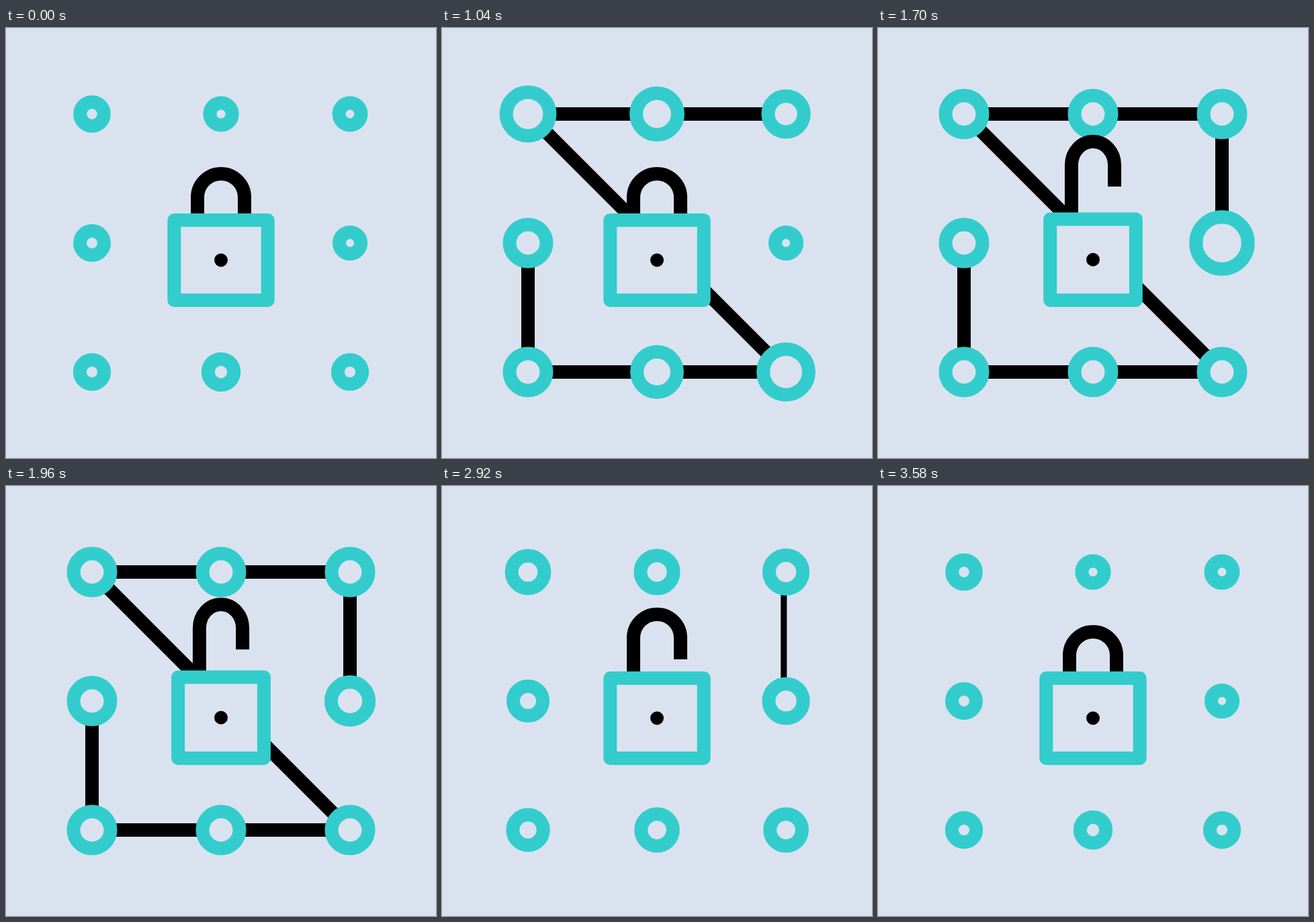
Animation of 640x640 px, one loop 3600 ms. Source, as an HTML page with a canvas:

```html
<!DOCTYPE html>
<html lang="en">
<head>
<meta charset="utf-8">
<title>Pattern lock</title>
<style>
  html, body { margin: 0; width: 100%; height: 100%; overflow: hidden; background: #dae2ef; }
  canvas { display: block; width: 640px; height: 640px; }
</style>
</head>
<body>
<canvas id="stage" width="640" height="640"></canvas>
<script>
const ctx = document.getElementById('stage').getContext('2d');
const LOOP = 3600, STEP = 20;
const BG = '#dae2ef', TEAL = '#33cccc', BLACK = '#000';
const STROKE = 20, OPEN_RADIUS = 27.5;

// Nodes in pattern order; "pop" is when the line reaches the node.
const nodes = [
  { x: 128, y: 320, small: 18, pop: 260, kick: 8.5 },
  { x: 128, y: 512, small: 18.1, pop: 475, kick: 8.5 },
  { x: 320, y: 512, small: 19.2, pop: 590, kick: 8.5 },
  { x: 512, y: 512, small: 18.1, pop: 680, kick: 8.5 },
  { x: 128, y: 128, small: 17.8, pop: 812, kick: 5 },
  { x: 320, y: 128, small: 16.6, pop: 890, kick: 5 },
  { x: 512, y: 128, small: 16.4, pop: 955, kick: 5 },
  { x: 512, y: 320, small: 16.1, pop: 1440, kick: 8.5 }
];

let pathLength = 0;
nodes.forEach((node, i) => {
  const prev = nodes[i - 1] || node;
  pathLength += Math.hypot(node.x - prev.x, node.y - prev.y);
  node.at = pathLength;
});

const progress = (t, start, duration) => Math.min(1, Math.max(0, (t - start) / duration));
const mix = (a, b, k) => a + (b - a) * k;
const easeInOut = p => (1 - Math.cos(Math.PI * p)) / 2;
const backOut = (p, kick) => 1 + (p - 1) ** 2 * ((kick + 1) * (p - 1) + kick);
const bell = p => Math.sin(Math.PI * p);

function headAt(t) {
  if (t <= nodes[0].pop) return 0;
  for (let i = 1; i < nodes.length; i++) {
    const from = nodes[i - 1], to = nodes[i];
    if (t < to.pop) {
      const p = progress(t, from.pop, to.pop - from.pop);
      return mix(from.at, to.at, i === nodes.length - 1 ? p ** 1.3 : p);
    }
  }
  return pathLength;
}

function drawTrail(t) {
  const head = headAt(t);
  const tail = Math.max(0, (t - 2304) * 2.44);
  const thin = progress(t, 2890, 55);
  if (head <= tail || thin === 1) return;
  ctx.save();
  ctx.translate(-6 * thin, 0);
  ctx.lineWidth = STROKE * (1 - thin);
  ctx.lineCap = ctx.lineJoin = 'round';
  ctx.strokeStyle = BLACK;
  ctx.setLineDash([head - tail, pathLength * 2]);
  ctx.lineDashOffset = -tail;
  ctx.beginPath();
  nodes.forEach(n => ctx.lineTo(n.x, n.y));
  ctx.stroke();
  ctx.restore();
}

function drawNode(node, i, t) {
  const grow = backOut(progress(t, node.pop, 570), node.kick);
  const shrink = easeInOut(progress(t, 2510 + 30 * i, 750));
  const radius = mix(mix(node.small, OPEN_RADIUS, grow), node.small, shrink);
  ctx.beginPath();
  ctx.arc(node.x, node.y, radius, 0, Math.PI * 2);
  ctx.fillStyle = BG;
  ctx.fill();
  ctx.lineWidth = STROKE;
  ctx.strokeStyle = TEAL;
  ctx.stroke();
}

function drawLock(t) {
  const opening = progress(t, 1350, 950);
  const closing = progress(t, 2960, 600);
  const lift = 26 * (backOut(opening, 7.5) - backOut(closing, 3));
  const squash = bell(opening) - 0.3 * bell(closing);
  const scale = 1 - 0.092 * squash;
  const arch = 35 * scale;
  const archY = 217 + 35 - lift;
  const bodyTop = 286 - 1.6 * squash;
  const halfBody = 69.7 * scale;

  ctx.lineWidth = STROKE;
  ctx.strokeStyle = BLACK;
  ctx.lineCap = 'butt';
  ctx.beginPath();
  ctx.moveTo(320 - arch, bodyTop);
  ctx.lineTo(320 - arch, archY);
  ctx.ellipse(320, archY, arch, 35, 0, Math.PI, Math.PI * 2);
  ctx.lineTo(320 + arch, archY + 32);
  ctx.stroke();

  ctx.lineJoin = 'round';
  ctx.strokeStyle = TEAL;
  ctx.fillStyle = BG;
  ctx.beginPath();
  ctx.rect(320 - halfBody, bodyTop, halfBody * 2, 405.3 - bodyTop);
  ctx.fill();
  ctx.stroke();

  ctx.fillStyle = BLACK;
  ctx.beginPath();
  ctx.arc(320, (bodyTop + 405) / 2, 10, 0, Math.PI * 2);
  ctx.fill();
}

function render(now) {
  const t = Math.floor((now % LOOP) / STEP) * STEP;
  ctx.fillStyle = BG;
  ctx.fillRect(0, 0, 640, 640);
  drawTrail(t);
  nodes.forEach((node, i) => drawNode(node, i, t));
  drawLock(t);
}

const start = performance.now();
function tick() {
  render(performance.now() - start);
  requestAnimationFrame(tick);
}
tick();
</script>
</body>
</html>
```
